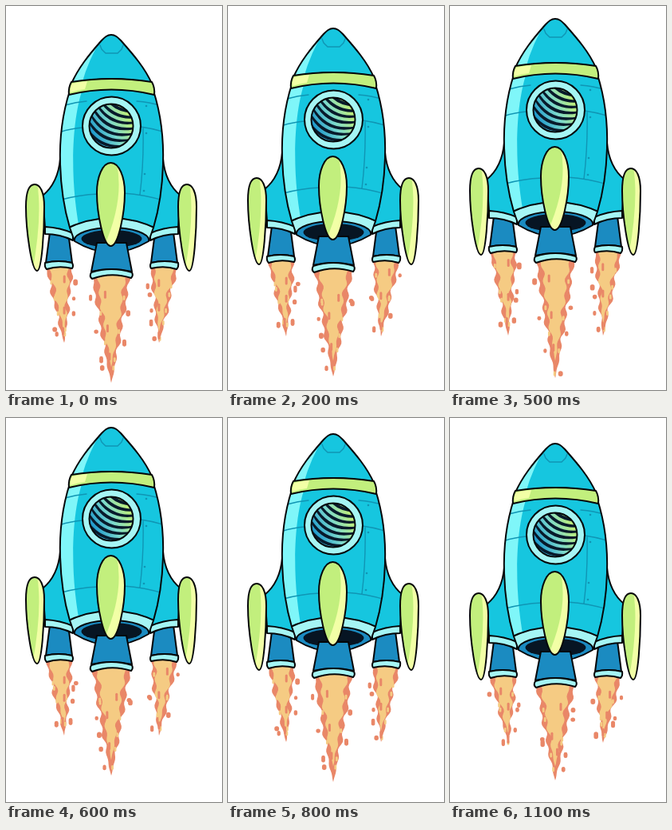
Write an HTML page that moves like this. It is 271x480 px and loops after 1200 ms.

```html
<!DOCTYPE html>
<html lang="en">
<head>
<meta charset="utf-8">
<title>Rocket</title>
<style>
  html, body { margin: 0; width: 100%; height: 100%; overflow: hidden; background: #fff; }
  svg { display: block; width: 100vw; height: 100vh; }
  .ink { stroke: #050608; stroke-width: 2; stroke-linejoin: round; stroke-linecap: round; }
  .seam { fill: none; stroke: #1095b4; stroke-width: 1.4; stroke-linecap: round; }
  .steel { fill: #1b8bc1; }
  .rim { fill: #a5f5f4; }
  .lime { fill: #c2ef7d; }
  .glow { fill: #f2ffa6; }
  .body { fill: #16c6df; }
  .shine { fill: #7ff6f9; }
</style>
</head>
<body>
<svg viewBox="0 0 271 480">
  <defs>
    <linearGradient id="glass" gradientUnits="userSpaceOnUse" x1="150" y1="128" x2="114" y2="170">
      <stop offset="0" stop-color="#c4ef72"/><stop offset=".5" stop-color="#7bd9cd"/><stop offset="1" stop-color="#1593cc"/>
    </linearGradient>
    <path id="hull" d="M80 105C70 136 67 166 68 197C69 232 74 256 80 276L86 293Q132 321 179 293L185 276C191 256 196 232 197 197C198 166 195 136 185 105Q132 91 80 105Z"/>
    <path id="cone" d="M132 35C127 35 124 38 120 42C104 60 91 76 82 96Q132 84 183 96C174 76 160 60 144 42C140 38 137 35 132 35Z"/>
    <path id="leaf" d="M131.500 195C142 195 149 213 149 232C149 258 141 299 131.500 299C122 299 114 258 114 232C114 213 121 195 131.500 195Z"/>
    <path id="sideFin" d="M36 222C43 222 48 232 48 250C48 279 45 330 39 330C32 330 25 279 25 250C25 232 29 222 36 222Z"/>
    <clipPath id="hullClip"><use href="#hull"/></clipPath>
    <clipPath id="coneClip"><use href="#cone"/></clipPath>
    <clipPath id="leafClip"><use href="#leaf"/></clipPath>
    <clipPath id="finClip"><use href="#sideFin"/></clipPath>
    <clipPath id="glassClip"><circle cx="132" cy="149" r="26.500"/></clipPath>
    <g id="wing">
      <path class="ink steel" d="M55 282L50 320Q66 316 83 320L78 282Z"/>
      <path class="ink rim" d="M49 320Q66 316 83 320Q85 324 83 327Q66 323 51 328Q48 325 49 320Z"/>
      <path class="ink body" d="M68 190C66 213 57 227 46 236L49 276Q68 277 86 288L90 230Z"/>
      <path class="ink rim" d="M49 275Q68 276 84 283V292Q68 284 49 284Z"/>
    </g>
    <g id="fin">
      <use href="#sideFin" class="lime"/>
      <path clip-path="url(#finClip)" class="glow" d="M39 220Q46 262 33 332H52V220Z"/>
      <use href="#sideFin" class="ink" fill="none"/>
    </g>
  </defs>

  <g id="rocket">
    <g id="fire"></g>
    <use href="#wing"/>
    <use href="#wing" transform="matrix(-1 0 0 1 265 0)"/>

    <use href="#hull" class="body"/>
    <g clip-path="url(#hullClip)">
      <path class="shine" d="M60 100H97C83 138 78 215 95 292H60Z"/>
      <path class="seam" d="M74 123Q88 119 101 118M164 118Q180 119 195 124M66 157Q82 152 96 151M169 150Q184 152 200 157M172 152Q173 195 168 235M66 242Q90 235 116 234M147 233Q176 235 200 243"/>
      <g fill="#1095b4">
        <circle cx="176" cy="158" r="1.300"/><circle cx="174" cy="209" r="1.300"/>
        <circle cx="173" cy="230" r="1.300"/><circle cx="176" cy="124" r="1.300"/>
      </g>
      <path class="ink rim" d="M72 279Q132 249 193 279V320H72Z"/>
      <ellipse class="ink steel" cx="132.500" cy="292" rx="47" ry="16"/>
      <ellipse cx="132.500" cy="290" rx="38" ry="11" fill="#071523"/>
    </g>
    <use href="#hull" class="ink" fill="none"/>

    <use href="#cone" class="body"/>
    <g clip-path="url(#coneClip)">
      <path class="shine" d="M70 100L116 40H120Q103 66 94 100Z"/>
      <path class="seam" d="M118 48L120 53L125 58H140L145 53L147 48"/>
    </g>
    <use href="#cone" class="ink" fill="none"/>
    <path class="ink lime" d="M82 94Q132 86 183 94Q187 101 186 110Q132 97 79 110Q78 101 82 94Z"/>
    <path class="glow" d="M83 96Q92 94 102 93L99 103Q90 104 81 107Q80 101 83 96Z"/>

    <circle class="ink rim" cx="132.500" cy="149" r="36.500"/>
    <circle class="ink" cx="132" cy="149" r="27.500" fill="#081a2b"/>
    <g clip-path="url(#glassClip)">
      <g id="stripes" transform="rotate(24 132 149)" fill="none" stroke="url(#glass)" stroke-width="4"></g>
    </g>

    <path class="ink steel" d="M114 295L107 331Q132 325 158 331L151 295Z"/>
    <path class="ink rim" d="M107 332Q132 324 158 332Q160 336 157 339Q132 331 108 340Q104 337 107 332Z"/>

    <use href="#leaf" class="lime"/>
    <path clip-path="url(#leafClip)" class="glow" d="M138 192Q150 240 122 302H155V192Z"/>
    <use href="#leaf" class="ink" fill="none"/>
    <use href="#fin"/>
    <use href="#fin" transform="translate(191 0)"/>
  </g>
</svg>
<script>
const STEP = 100, STEPS = 12, RISE = 4, POSES = 4;
const CORAL = "#e98768", TAN = "#f5cb83";
const byId = id => document.getElementById(id);
const rocket = byId("rocket"), fire = byId("fire"), stripes = byId("stripes");

const flames = [
  { x: 66.5, tipX: 73, top: 322, half: 17, length: 98, swing: 11, drops: 5, seed: 3 },
  { x: 198.5, tipX: 192, top: 322, half: 17, length: 98, swing: 11, drops: 5, seed: 8 },
  { x: 132, tipX: 132, top: 330, half: 25, length: 140, swing: 14, drops: 6, seed: 5 }
];

function add(parent, tag, attrs) {
  const el = document.createElementNS("http://www.w3.org/2000/svg", tag);
  for (const key in attrs) el.setAttribute(key, attrs[key]);
  return parent.appendChild(el);
}

function random(seed) {
  return () => (seed = (seed * 16807 + 11) % 2147483647) / 2147483647;
}

const axis = (f, t) => f.x + (f.tipX - f.x) * t;

// A tapering tongue whose drips travel down by a quarter wave per pose.
function tongue(f, length, half, phase) {
  const edge = side => {
    const points = [];
    for (let y = 0; y < length; y += 3) {
      const t = y / length;
      const a = y / 3.2 - phase + side * f.seed;
      const drip = (Math.sin(a) + 0.6 * Math.sin(a * 0.5 + f.seed)) * 1.7;
      const fade = Math.min(1, t * 6, (1 - t) * 3);
      const width = half * (1 - t) ** 0.9 + drip * fade;
      points.push(`${axis(f, t) + side * width},${f.top + y}`);
    }
    return points;
  };
  return [...edge(-1), `${axis(f, 1)},${f.top + length}`, ...edge(1).reverse()].join(" ");
}

function bead(parent, x, y, rx, ry, fill) {
  add(parent, "rect", { x: x - rx, y: y - ry, width: rx * 2, height: ry * 2, rx, fill });
}

function drawFlame(parent, f, pose) {
  const phase = pose * Math.PI / 2;
  const length = f.length + f.swing * Math.sin(phase);
  const rnd = random(f.seed * 7919 + pose * 104729);
  add(parent, "polygon", { points: tongue(f, length, f.half, phase), fill: CORAL });
  add(parent, "polygon", { points: tongue(f, length * 0.86, f.half * 0.74, phase + 2), fill: TAN });

  for (let k = 0; k < f.drops; k++) {
    const t = 0.2 + 0.8 * (k + rnd()) / f.drops;
    const side = rnd() < 0.5 ? -1 : 1;
    const y = f.top + t * length;
    const reach = f.half * (1 - t);
    bead(parent, axis(f, t) + side * (reach + 5 + rnd() * 3), y, 2 + rnd(), 2.5 + rnd() * 2, CORAL);
    bead(parent, axis(f, t) - side * reach * 0.85, y, 1.4, 3, TAN);
    if (k % 2 === 0) bead(parent, axis(f, t) + side * reach * 0.4, y - 4, 1.5, 5, CORAL);
  }
}

const poses = Array.from({ length: POSES }, (_, pose) => {
  const g = add(fire, "g", {});
  flames.forEach(f => drawFlame(g, f, pose));
  return g;
});

for (let y = 110; y < 172; y += 8) {
  add(stripes, "path", { d: `M102 ${y}Q132 ${y + 22} 162 ${y}` });
}

function draw() {
  const step = Math.floor(performance.now() / STEP) % STEPS;
  const lift = RISE * (STEPS / 2 - Math.abs(STEPS / 2 - step));
  rocket.setAttribute("transform", `translate(0 ${1 - lift})`);
  poses.forEach((g, i) => g.setAttribute("display", i === step % POSES ? "inline" : "none"));
  requestAnimationFrame(draw);
}
draw();
</script>
</body>
</html>
```
